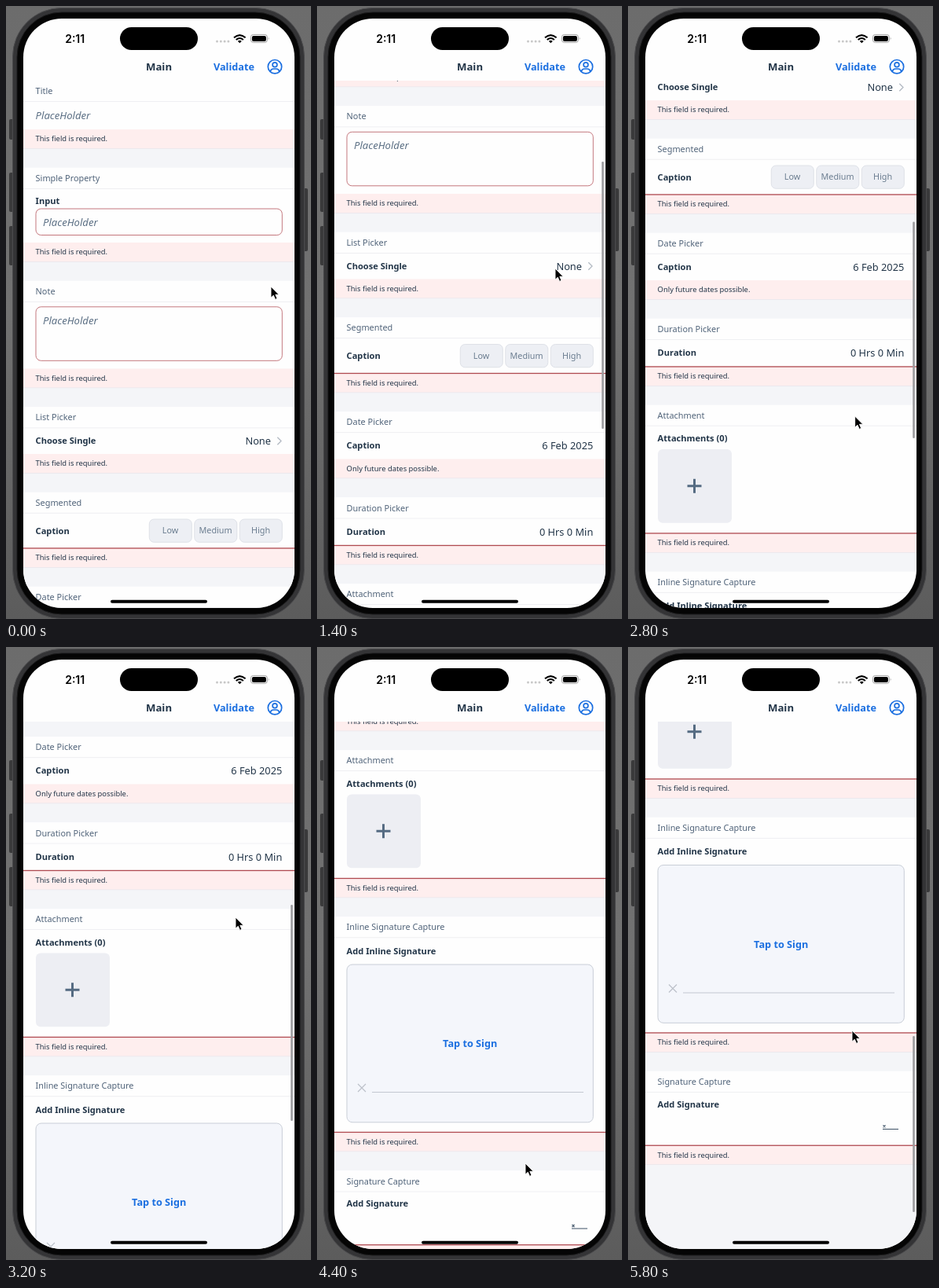
Recreate the animation shown at these times as an HTML page. Size 388x780 px, loop 6000 ms.

```html
<!DOCTYPE html>
<html lang="en">
<head>
<meta charset="utf-8">
<title>Form validation</title>
<style>
  html, body { margin: 0; width: 100%; height: 100%; overflow: hidden; background: #686868; }
  svg { display: block; width: 388px; height: 780px; }
  text { font-family: "Noto Sans", "Open Sans", sans-serif; fill: #223548; }
  .head { font-size: 10.9px; fill: #51647a; }
  .err { font-size: 9.4px; }
  .label { font-size: 11.1px; font-weight: 600; }
  .value { font-size: 12.8px; text-anchor: end; }
  .hint { font-size: 13.1px; font-style: italic; fill: #5b6f84; }
  .seg { font-size: 10.8px; fill: #6b7d90; text-anchor: middle; }
  .nav { font-size: 13.2px; font-weight: 800; text-anchor: middle; }
  .link { font-size: 12.7px; font-weight: 600; fill: #1b6fe0; text-anchor: middle; }
  .clock { font: 600 14px Inter, sans-serif; fill: #000; text-anchor: middle; }
</style>
</head>
<body>
<svg viewBox="0 0 388 780">
  <defs>
    <linearGradient id="wall" x2="0" y2="1">
      <stop offset="0" stop-color="#6c6c6c"/><stop offset=".5" stop-color="#727272"/><stop offset="1" stop-color="#5c5c5c"/>
    </linearGradient>
    <clipPath id="screen"><rect x="22" y="16" width="345" height="750" rx="49"/></clipPath>
    <clipPath id="view"><rect x="22" y="95" width="345" height="680"/></clipPath>
  </defs>

  <rect width="388" height="780" fill="url(#wall)"/>
  <g fill="#3a3a3b">
    <rect x="4" y="144" width="6" height="26" rx="2"/>
    <rect x="4" y="212" width="6" height="50" rx="2"/>
    <rect x="4" y="280" width="6" height="50" rx="2"/>
    <rect x="378" y="232" width="6" height="80" rx="2"/>
  </g>
  <rect x="8.5" y="2.5" width="371" height="777" rx="62" fill="#343436" stroke="#4c4c4e"/>
  <rect x="14" y="8" width="360" height="766" rx="57" fill="#050505" stroke="#1b1b1c"/>

  <g clip-path="url(#screen)">
    <rect x="22" y="16" width="345" height="750" fill="#fefefe"/>
    <g clip-path="url(#view)"><g id="form"></g></g>
    <rect id="bar" x="362.2" width="2.6" rx="1.3" fill="#9b9b9e"/>
    <rect x="133" y="755.7" width="123" height="4" rx="2"/>
  </g>

  <text class="clock" x="87.7" y="46.7">2:11</text>
  <rect x="145" y="27" width="99" height="29" rx="14.5"/>
  <g fill="#c8c8c8">
    <circle cx="268.5" cy="45" r="1.5"/><circle cx="273.3" cy="45" r="1.5"/>
    <circle cx="278.1" cy="45" r="1.5"/><circle cx="282.9" cy="45" r="1.5"/>
  </g>
  <g fill="none" stroke="#000" stroke-width="2.1">
    <path d="M290 40.3Q297.3 33.8 304.6 40.3M292.7 43Q297.3 39 301.9 43"/>
  </g>
  <path d="M294.8 44.8Q297.3 42.9 299.8 44.8L297.3 47.3Z"/>
  <rect x="311.4" y="36.4" width="21" height="10" rx="3.2" fill="none" stroke="#999" stroke-width=".9"/>
  <rect x="312.9" y="37.9" width="18" height="7" rx="2"/>
  <path d="M333.8 39.6q1.6 1.8 0 3.6Z" fill="#999"/>

  <text class="nav" x="194.5" y="82.2">Main</text>
  <text class="link" x="290" y="82">Validate</text>
  <g fill="none" stroke="#1b6fe0" stroke-width="1.7">
    <circle cx="342" cy="77.2" r="8.7"/>
    <circle cx="342" cy="74.7" r="2.9"/>
    <path d="M336.2 83.2Q337.2 80 340 80H344Q346.8 80 347.8 83.2"/>
  </g>

  <path id="cursor" d="M0 0V14.2L3.3 11.2L5.6 16.4L8 15.3L5.8 10.3H10.2Z" fill="#000" stroke="#fff" stroke-width=".9"/>
</svg>
<script>
const $ = id => document.getElementById(id);
const rect = (x, y, w, h, fill, extra = "") =>
  `<rect x="${x}" y="${y}" width="${w}" height="${h}" fill="${fill}" ${extra}/>`;
const path = (d, color, width) =>
  `<path d="${d}" fill="none" stroke="${color}" stroke-width="${width}"/>`;
const sizes = { head: 10.9, err: 9.4, label: 11.1, value: 12.8, hint: 13.1, seg: 10.8, link: 12.7 };
// mid is the middle of the capital letters
const text = (cls, x, mid, str) =>
  `<text class="${cls}" x="${x}" y="${mid + sizes[cls] * 0.36}">${str}</text>`;

const header = (y, title) =>
  rect(22, y + 26.5, 345, 0.8, "#ebecef") + text("head", 37.6, y + 13.5, title);
const label = (mid, str) => text("label", 37.6, mid, str);
const value = (mid, str, x = 351.3) => text("value", x, mid, str);
const field = (y, h) =>
  rect(38, y, 313.3, h, "#fefefe", 'rx="6.5" stroke="#c4777d" stroke-width="1"') +
  text("hint", 47, y + 17.2, "PlaceHolder");

// Error strip with the gap below it
const error = (y, strong, str = "This field is required.", gap = 24.3) =>
  rect(22, y, 345, 24.3, "#feeeee") +
  rect(22, y + 24.3, 345, gap, "#f4f5f8") +
  rect(22, y + 24, 345, 0.7, "#e9e3e8") +
  (strong ? rect(22, y - 0.7, 345, 1.3, "#b04a50") : "") +
  text("err", 37.6, y + 12, str);

const segments = ["Low", "Medium", "High"].map((name, i) => {
  const x = 182.3 + i * 57.5;
  return rect(x, 653, 54, 29.3, "#edeff4", 'rx="6" stroke="#dcdfe6" stroke-width=".9"') +
    text("seg", x + 26.8, 667.6, name);
}).join("");

$("form").innerHTML = [
  header(94.5, "Title"),
  text("hint", 37.6, 139.6, "PlaceHolder"),
  error(157, false),

  header(205.7, "Simple Property"),
  label(247.6, "Input"),
  field(258, 33.5),
  error(301, false),

  header(349.5, "Note"),
  field(382.8, 68.5),
  error(461.5, false),

  header(510, "List Picker"),
  label(553.5, "Choose Single"),
  value(553.5, "None", 337),
  path("M345.3 548.8L350 553.5L345.3 558.2", "#b3bac3", 1.3),
  error(570, false),

  header(618.3, "Segmented"),
  label(667.6, "Caption"),
  segments,
  error(690, true),

  header(738.3, "Date Picker"),
  label(782, "Caption"),
  value(782, "6 Feb 2025"),
  error(799, false, "Only future dates possible."),

  header(847.6, "Duration Picker"),
  label(891.5, "Duration"),
  value(891.5, "0 Hrs 0 Min"),
  error(909, true),

  header(957.2, "Attachment"),
  label(1000.2, "Attachments (0)"),
  rect(38, 1014, 94, 93.7, "#edeef3", 'rx="6"'),
  path("M75.5 1060.8h18M84.5 1051.8v18", "#556b82", 3),
  error(1121, true),

  header(1169.4, "Inline Signature Capture"),
  label(1213.5, "Add Inline Signature"),
  rect(38, 1230.5, 313.3, 200.8, "#f4f6fb", 'rx="7" stroke="#c9ced7" stroke-width="1"'),
  text("link", 194.7, 1331, "Tap to Sign"),
  path("M52 1382.5l10 10M62 1382.5l-10 10", "#bcc1c9", 1.2),
  path("M70 1393h269", "#c3c8d1", 1.2),
  error(1444, true),

  header(1492.6, "Signature Capture"),
  label(1535, "Add Signature"),
  path("M324 1566.5h20M324.5 1561.5l3 3M327.5 1561.5l-3 3", "#3d5166", 1.1),
  error(1587.3, true, undefined, 900)
].join("");

// Tracks: [time, values...], linear between entries
const scroll = [[0, 0], [200, 3], [400, 15], [600, 36], [800, 75], [1400, 222.5], [1600, 268], [1800, 300],
  [2000, 322], [2200, 334.5], [2600, 362], [2800, 450], [3200, 624.5], [3400, 710], [3600, 772],
  [3800, 808], [4000, 822], [4200, 826.5], [4400, 826.5], [4600, 836], [5000, 895], [5400, 936], [5800, 953]];
const pointer = [[0, 337, 357], [200, 337, 356], [600, 337, 333], [1000, 325, 240], [1400, 303, 334],
  [1800, 292, 545], [2200, 287, 638], [2600, 287, 611], [3200, 292, 344], [3600, 291, 335],
  [4000, 276, 560], [4400, 265, 657], [4600, 267, 645], [5200, 277, 538], [5800, 285, 488]];
const thumb = [[0, 96, 421], [600, 113, 438], [1400, 198, 538], [2200, 221, 497], [2400, 221, 497], [3200, 328, 603],
  [4000, 401, 677], [4600, 406, 682], [5000, 428, 712], [5200, 445, 719], [5800, 495, 719]];

function at(track, t) {
  const i = track.findIndex(p => p[0] >= t);
  const b = track[i], a = track[Math.max(0, i - 1)];
  const k = b === a ? 0 : (t - a[0]) / (b[0] - a[0]);
  return a.slice(1).map((v, j) => v + (b[j + 1] - v) * k);
}

function draw(now) {
  let t = Math.floor(now % 6000 / 200) * 200;
  if (t === 2400) t = 2200; // pause before the second drag
  const [y] = at(scroll, t), [cx, cy] = at(pointer, t), [top, end] = at(thumb, t);
  $("form").setAttribute("transform", `translate(0 ${-y})`);
  $("cursor").setAttribute("transform", `translate(${cx} ${cy})`);
  $("bar").setAttribute("y", top);
  $("bar").setAttribute("height", end - top);
  $("bar").setAttribute("opacity", t < 200 || t === 4400 ? 0 : 1);
}

const start = performance.now();
function loop() {
  draw(performance.now() - start);
  requestAnimationFrame(loop);
}
loop();
</script>
</body>
</html>
```
